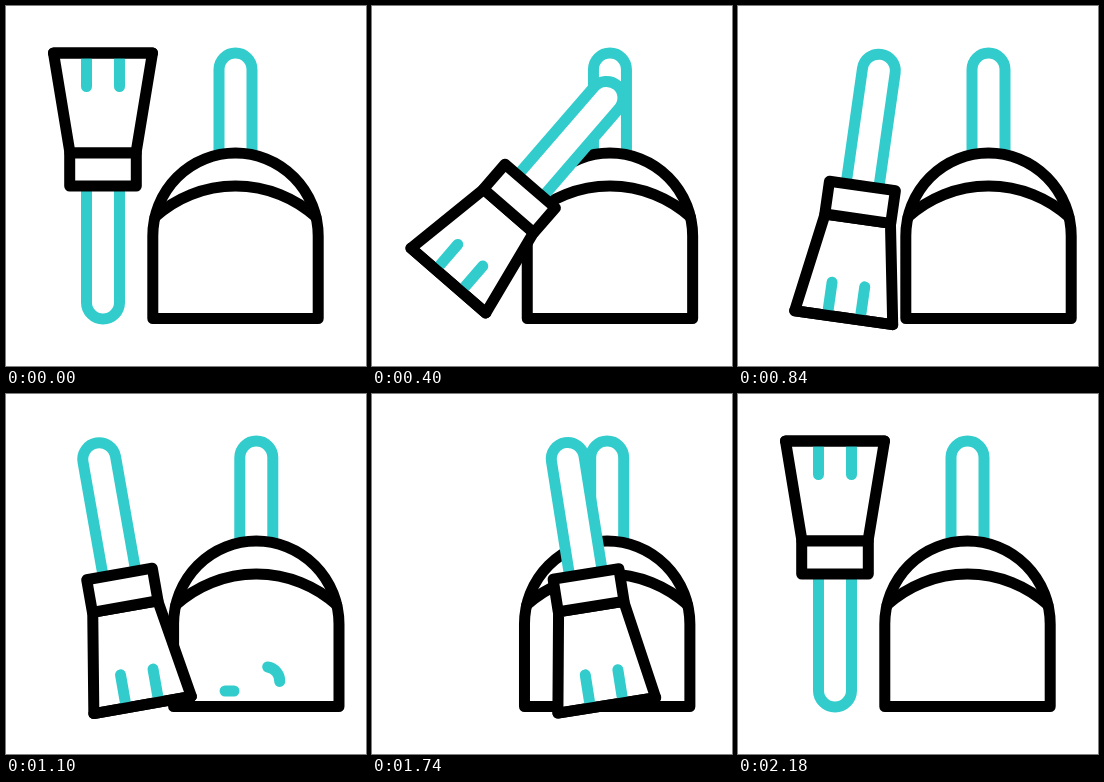
Recreate the animation shown at these times as an HTML page. Size 360 px wide and 360 px high, loop 2.4 s.

```html
<!DOCTYPE html>
<html lang="en">
<head>
<meta charset="utf-8">
<title>Broom and dustpan</title>
<style>
  html, body { margin: 0; width: 100%; height: 100%; overflow: hidden; background: #fff; }
  svg { display: block; width: 100%; height: 100%; }
  path { stroke-width: 11; stroke-linecap: round; stroke-linejoin: round; fill: none; }
  .ink { stroke: #000; }
  .teal { stroke: #33cccc; }
  .solid { fill: #fff; }
  .handle { stroke-linecap: butt; }
</style>
</head>
<body>
<svg viewBox="0 0 360 360">
  <g id="pan">
    <path class="teal solid handle" d="M213 150V63.5a16.5 16.5 0 0 1 33 0V150"/>
    <path class="ink solid" d="M146.8 312.5V230a82.7 83 0 0 1 165.4 0V312.5Z"/>
    <path class="ink" d="M149 211A120 120 0 0 1 310 211"/>
  </g>
  <g id="dust">
    <path class="teal" pathLength="1" d="M210 297H228"/>
    <path class="teal" pathLength="1" d="M246 284A14 14 0 0 1 273.7 287.5"/>
  </g>
  <!-- The broom's own origin is the middle of the line where the handle meets the ferrule. -->
  <g id="broom">
    <path class="teal solid handle" d="M-16.5 0V-116.5a16.5 16.5 0 0 1 33 0V0"/>
    <path class="ink solid" id="bristles"/>
    <path class="teal" id="teeth" d="M-16.5 99.5V126M16.5 99.5V126"/>
    <path class="ink" id="rim"/>
    <path class="ink solid" d="M-33.3 0H33.3V33H-33.3Z"/>
  </g>
</svg>
<script>
const LOOP = 2400;
const el = id => document.getElementById(id);
const pan = el('pan'), dust = el('dust'), broom = el('broom');
const bristles = el('bristles'), teeth = el('teeth'), rim = el('rim');
const bits = dust.querySelectorAll('path');

// Smooth curve through [time, value] keys that never overshoots them.
function track(...keys) {
  const rate = i => (keys[i + 1][1] - keys[i][1]) / (keys[i + 1][0] - keys[i][0]);
  const slopes = keys.map((_, i) => {
    if (i === 0 || i === keys.length - 1) return 0;
    const a = rate(i - 1), b = rate(i);
    return a * b > 0 ? 2 * a * b / (a + b) : 0;
  });
  return t => {
    const last = keys.length - 1;
    if (t <= keys[0][0]) return keys[0][1];
    if (t >= keys[last][0]) return keys[last][1];
    const i = keys.findIndex(k => k[0] > t) - 1;
    const [t0, v0] = keys[i], [t1, v1] = keys[i + 1];
    const h = t1 - t0, u = (t - t0) / h, w = 1 - u;
    return v0 * (1 + 2 * u) * w * w + v1 * u * u * (3 - 2 * u)
      + h * u * w * (slopes[i] * w - slopes[i + 1] * u);
  };
}

const panX = track([0, 0], [240, 4], [560, 13.2], [940, 22], [1100, 20.8],
  [1420, 13.7], [1740, 5.7], [2120, 0]);
const broomX = track([0, 97], [240, 134], [560, 171.5], [780, 129], [1100, 113.5],
  [1420, 157.5], [1740, 214], [2160, 97]);
const tilt = track([0, 180], [240, 108], [560, 0], [780, 10], [1100, -10],
  [1420, 10], [1740, -9], [2160, 180]);
const squash = track([0, 0], [240, 16], [560, 0], [1740, 0], [1980, 16], [2160, 0]);

const ramp = (t, from, to) => Math.min(1, Math.max(0, (t - from) / (to - from)));

function draw(t) {
  pan.setAttribute('transform', `translate(${panX(t)} 0)`);
  broom.setAttribute('transform', `translate(${broomX(t)} 180) rotate(${tilt(t)})`);

  const short = squash(t), end = 133 - short;
  bristles.setAttribute('d', `M-33 33L-49.5 ${end}H49.5L33 33Z`);
  rim.setAttribute('d', `M-49.5 ${end}H49.5`);
  teeth.setAttribute('transform', `translate(0 ${-short})`);

  const head = ramp(t, 900, 1100), tail = ramp(t, 1000, 1200);
  dust.style.display = head > tail ? '' : 'none';
  for (const bit of bits) {
    bit.setAttribute('stroke-dasharray', `${head - tail} 3`);
    bit.setAttribute('stroke-dashoffset', -tail);
  }
}

const start = performance.now();
function tick() {
  draw((performance.now() - start) % LOOP);
  requestAnimationFrame(tick);
}
tick();
</script>
</body>
</html>
```
